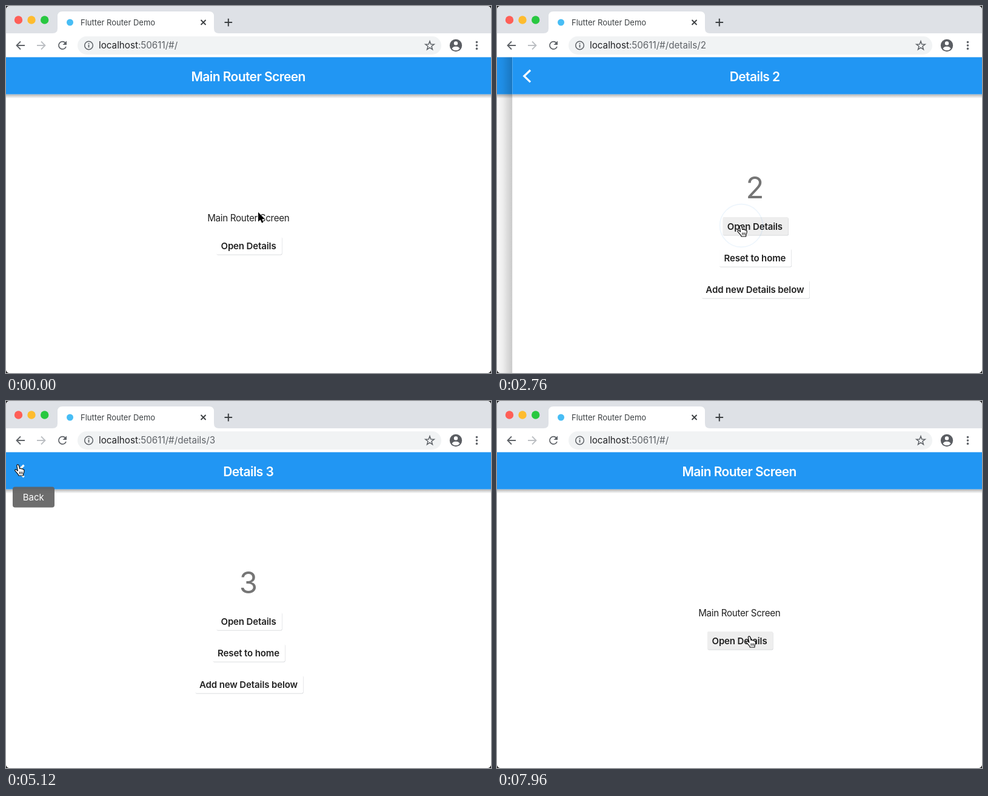
An HTML page for the animation above (8 s loop, 800 by 605 pixels).

```html
<!DOCTYPE html>
<html lang="en">
<head>
<meta charset="utf-8">
<title>Flutter Router Demo</title>
<style>
  html, body { margin: 0; width: 100%; height: 100%; overflow: hidden; background: #222; }
  svg { display: block; width: 100vw; height: 100vh; border-radius: 6px; overflow: hidden; background: #fff; }
  text { font-family: Inter, "Open Sans", sans-serif; white-space: pre; }
  .mid { text-anchor: middle; }
  .title { font-size: 21px; font-weight: 600; letter-spacing: -.58px; fill: #fff; }
  .body { font-size: 15.2px; letter-spacing: -.33px; fill: #212121; }
  .label { font-size: 15px; font-weight: 600; letter-spacing: -.12px; fill: #212121; }
  .number { font-size: 49px; fill: #757575; }
  .url { font-size: 15.2px; fill: #5f6368; }
  .tab { font-size: 13px; fill: #3c4043; }
  .line { fill: none; stroke: #5f6368; stroke-width: 1.8; }
</style>
</head>
<body>
<svg id="stage" viewBox="0 0 800 605">
  <defs>
    <linearGradient id="drop" x2="0" y2="1">
      <stop stop-opacity=".3"/><stop offset=".5" stop-opacity=".14"/><stop offset="1" stop-opacity="0"/>
    </linearGradient>
    <linearGradient id="edge">
      <stop stop-opacity="0"/><stop offset=".3" stop-opacity=".016"/>
      <stop offset=".6" stop-opacity=".07"/><stop offset="1" stop-opacity=".22"/>
    </linearGradient>
  </defs>

  <g id="pages"></g>

  <g id="tooltip">
    <rect x="11" y="141.5" width="69" height="34" rx="4" fill="#616161" fill-opacity=".92"/>
    <text class="mid" x="45.3" y="164.3" font-size="15" fill="#fff">Back</text>
  </g>

  <g id="browser">
    <rect width="800" height="46" fill="#dee1e6"/>
    <circle cx="20.5" cy="23" r="6.7" fill="#ff5f57"/>
    <circle cx="42" cy="23" r="6.7" fill="#febc2e"/>
    <circle cx="63.7" cy="23" r="6.7" fill="#28c840"/>
    <path d="M77 45q8 0 8-8V17q0-8 8-8H335q8 0 8 8V37q0 8 8 8Z" fill="#fff"/>
    <circle cx="105.5" cy="27" r="5.5" fill="#47bdf5"/>
    <text class="tab" x="123" y="31.6">Flutter Router Demo</text>
    <path class="line" d="M321.5 23l8 8m0-8l-8 8" style="stroke:#3c4043"/>
    <path class="line" d="M366.8 20.8v12.6M360.5 27.1h12.6" style="stroke:#3c4043;stroke-width:2"/>
    <rect y="45" width="800" height="39.4" fill="#fff"/>
    <path class="line" d="M31 65H18M24 58.5L17.5 65L24 71.5"/>
    <path class="line" d="M51 65H64M58 58.5L64.5 65L58 71.5" style="stroke:#bcbfc3"/>
    <path class="line" d="M97.8 60.8A6.2 6.2 0 1 0 99 67"/>
    <path d="M100 57.5V64H93.5Z" fill="#5f6368"/>
    <rect x="118" y="50" width="600" height="30" rx="15" fill="#f1f3f4"/>
    <circle class="line" cx="136.5" cy="65" r="6.8" style="stroke-width:1.5"/>
    <path class="line" d="M136.5 63.8v4.8M136.5 60.9v1.7"/>
    <text class="url" x="153" y="70.3"><tspan fill="#202124">localhost</tspan>:50611/#/<tspan id="path"></tspan></text>
    <path id="star" class="line" style="stroke-width:1.5"/>
    <circle cx="742" cy="65" r="10.2" fill="#5a5d62"/>
    <circle cx="742" cy="61.4" r="3.2" fill="#fff"/>
    <path d="M735.6 70.2q1.6-3.4 6.4-3.4t6.4 3.4q-2.4 3-6.4 3t-6.4-3Z" fill="#fff"/>
    <g fill="#5f6368">
      <circle cx="776.5" cy="59.6" r="1.8"/><circle cx="776.5" cy="65" r="1.8"/><circle cx="776.5" cy="70.4" r="1.8"/>
    </g>
  </g>

  <circle id="ring" fill="none" stroke="#7fb4e6"/>
  <path id="arrow" d="M0 0V15.5L3.6 12.2L6 17.6L8.5 16.5L6.2 11.2H11Z" stroke="#fff" stroke-width="1" paint-order="stroke"/>
  <g id="hand" stroke="#111" stroke-width="1.2" stroke-linejoin="round">
    <path fill="#fff" d="M-2.2 1.2C-2-.6.6-.7 1.1 1L2.6 6.6C3.4 5.6 5 5.8 5.4 7C6.2 6.3 7.6 6.7 7.9 7.8C9 7.4 10 8.2 10 9.4C10.2 12.5 9.4 13.6 8.6 15L8.4 18H.8L.4 16.4C-1.4 14.6-3 12-5.2 9.8C-5.9 8.2-3.9 7.3-2.6 8.6L-.6 10.2Z"/>
    <path d="M2.5 11.5v4M4.7 11.5v4M6.9 11.5v4" stroke-width="1"/>
  </g>
</svg>

<script>
const LOOP = 8000, SLIDE = 400, RING = 450;
const $ = id => document.getElementById(id);
const clamp = v => Math.max(0, Math.min(1, v));

// start time, page left, page shown, kind
const ROUTES = [
  [1588, 'home', '1', 'push'],
  [2500, '1', '2', 'push'],
  [3490, '2', '3', 'push'],
  [5230, '3', '4', 'pop'],
  [5950, '4', '2', 'pop'],
  [7010, '2', 'home', 'pop']
];
const CLICKS = [1480, 2410, 3400, 4350, 5140, 5860, 6920];

// time, x, y of the pointer's hot spot
const POINTER = [
  [0, 416, 340], [480, 416, 340], [760, 417, 398], [1940, 417, 398],
  [2240, 403, 362], [3440, 401, 362], [3700, 401, 362], [4060, 417, 473],
  [4560, 417, 473], [4900, 20, 105], [6160, 20, 105], [6520, 453, 354],
  [6760, 417, 411], [7350, 417, 411], [7620, 416.5, 388], [LOOP, 416.5, 388]
];

const HOME_BUTTONS = [['Open Details', 347, 380, 108]];
const DETAIL_BUTTONS = [
  ['Open Details', 347, 348, 108],
  ['Reset to home', 341, 400, 119],
  ['Add new Details below', 312, 452, 178]
];

function makePage(name) {
  const home = name === 'home';
  const title = home ? 'Main Router Screen' : 'Details ' + name;
  const buttons = home ? HOME_BUTTONS : DETAIL_BUTTONS;
  const node = document.createElementNS('http://www.w3.org/2000/svg', 'g');
  node.innerHTML = `
    <rect class="shade" x="-40" y="84" width="40" height="521" fill="url(#edge)"/>
    <rect y="84" width="800" height="521" fill="#fff"/>
    <rect y="145.5" width="800" height="7" fill="url(#drop)"/>
    <rect y="84" width="800" height="61.5" fill="#2196f3"/>
    <text class="mid title" x="399.7" y="123.6">${title}</text>
    ${home
      ? `<text class="mid body" x="399.8" y="355">${title}</text>`
      : `<path d="M29.6 105.8L19.4 115.6L29.6 125.4" fill="none" stroke="#fff" stroke-width="3.3"/>
         <text class="mid number" x="400" y="317">${name}</text>`}
    ${buttons.map(([label, x, y, w]) => `
      <rect x="${x + .5}" y="${y + 1}" width="${w}" height="29.6" rx="2" fill="#d0d2d5"/>
      <rect class="face" x="${x}" y="${y}" width="${w}" height="29.8" rx="2"/>
      <text class="mid label" x="400" y="${y + 20.6}">${label}</text>`).join('')}`;
  $('pages').append(node);
  return { node, buttons, home, faces: node.querySelectorAll('.face'), shade: node.querySelector('.shade') };
}

const pages = {};
for (const name of ['home', '1', '2', '3', '4']) pages[name] = makePage(name);

$('star').setAttribute('d', 'M' + Array.from({ length: 10 }, (_, i) => {
  const r = i % 2 ? 3.1 : 7.6, a = i * Math.PI / 5;
  return `${699 + r * Math.sin(a)} ${65.5 - r * Math.cos(a)}`;
}).join('L') + 'Z');

const bezier = (s, a, b) => 3 * (1 - s) ** 2 * s * a + 3 * (1 - s) * s * s * b + s ** 3;

function slideEase(x) {
  if (x <= 0 || x >= 1) return clamp(x);
  let lo = 0, hi = 1;
  for (let i = 0; i < 20; i++) {
    const mid = (lo + hi) / 2;
    if (bezier(mid, .35, .33) < x) lo = mid; else hi = mid;
  }
  return bezier(lo, .91, .97);
}

function pointerAt(t) {
  const i = POINTER.findIndex(key => key[0] > t);
  const [t0, x0, y0] = POINTER[i - 1], [t1, x1, y1] = POINTER[i];
  const p = (t - t0) / (t1 - t0), e = p * p * (3 - 2 * p);
  return [x0 + (x1 - x0) * e, y0 + (y1 - y0) * e];
}

// The edge shadow fades with the part of the page that is in view.
function place(page, x) {
  page.node.style.display = '';
  page.node.setAttribute('transform', `translate(${x})`);
  page.shade.setAttribute('opacity', clamp(1 - x / 800));
  $('pages').append(page.node);
}

const inside = ([, bx, by, w], x, y, inset) =>
  x >= bx + inset && x <= bx + w - inset && y >= by + inset && y <= by + 30 - inset;

function render(t) {
  for (const p of Object.values(pages)) p.node.style.display = 'none';
  const route = ROUTES.filter(r => r[0] <= t).pop();
  const current = route ? route[2] : 'home', page = pages[current];
  let offset = 0;

  if (route && t < route[0] + SLIDE) {
    const e = slideEase((t - route[0]) / SLIDE), old = pages[route[1]];
    if (route[3] === 'push') {
      offset = 800 * (1 - e);
      place(old, -800 / 3 * e);
      place(page, offset);
    } else {
      offset = -800 / 3 * (1 - e);
      place(page, offset);
      place(old, 800 * e);
    }
  } else place(page, 0);

  $('path').textContent = current === 'home' ? '' : 'details/' + current;

  const [x, y] = pointerAt(t);
  const click = CLICKS.filter(c => c <= t).pop();
  const age = click === undefined ? Infinity : t - click;
  const onBack = !page.home && x < 48 && y > 90 && y < 142;
  let hit = onBack;
  page.buttons.forEach((b, i) => {
    hit = hit || inside(b, x - offset, y, 0);
    const hover = inside(b, x - offset, y, 4);
    page.faces[i].setAttribute('fill', hover ? (age < 110 ? '#e0e0e0' : '#eeeeee') : '#fff');
  });

  for (const [id, shown] of [['hand', hit], ['arrow', !hit]]) {
    $(id).style.display = shown ? '' : 'none';
    $(id).setAttribute('transform', `translate(${x} ${y})`);
  }

  const grow = age / RING, ring = $('ring');
  ring.style.display = grow < 1 ? '' : 'none';
  if (grow < 1) {
    const [cx, cy] = pointerAt(click);
    ring.setAttribute('cx', cx);
    ring.setAttribute('cy', cy);
    ring.setAttribute('r', 19 + 21 * grow);
    ring.setAttribute('stroke-width', 4 - 3 * grow);
    ring.setAttribute('opacity', .65 * (1 - grow));
  }

  $('tooltip').setAttribute('opacity', Math.min(clamp((t - 4880) / 150), clamp((6420 - t) / 150)));
}

const begin = performance.now();
function tick() {
  render((performance.now() - begin) % LOOP);
  requestAnimationFrame(tick);
}
tick();
</script>
</body>
</html>
```
